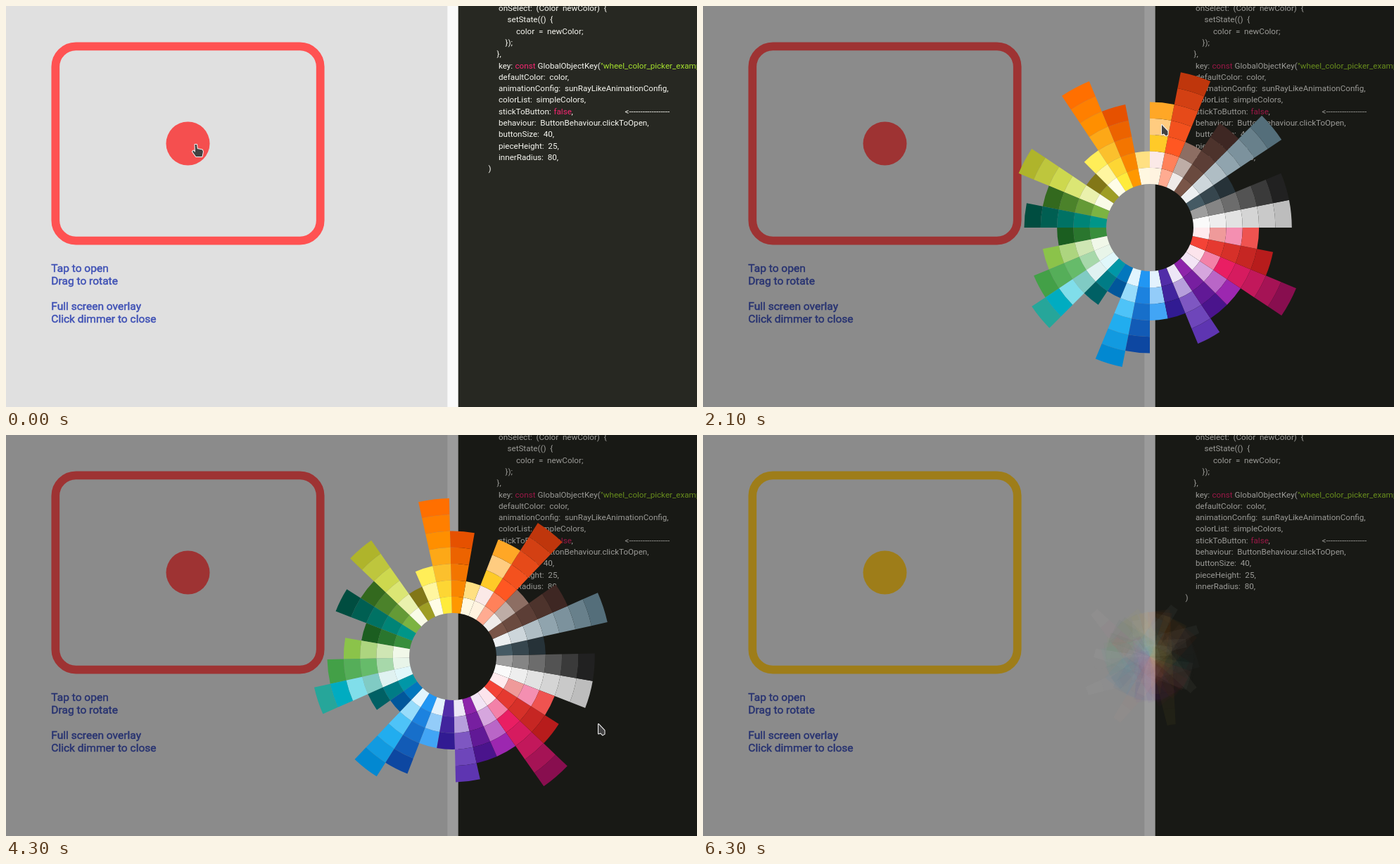
An HTML page with a canvas for the animation above (6.4 s loop, 982 px wide and 570 px high).

```html
<!DOCTYPE html>
<html lang="en">
<head>
<meta charset="utf-8">
<title>Wheel color picker</title>
<style>
html, body { margin: 0; width: 100%; height: 100%; overflow: hidden; background: #e0e0e0; }
canvas { display: block; }
</style>
</head>
<body>
<canvas id="stage" width="982" height="570"></canvas>
<script>
const ctx = document.getElementById('stage').getContext('2d');
const LOOP = 6400, STEP = 100;
const INNER = 62, PIECE = 23.3, SLICE = Math.PI / 16;

const clamp = v => Math.max(0, Math.min(1, v));
const mix = (a, b, k) => a + (b - a) * k;
const ramp = (t, from, to) => clamp((t - from) / (to - from));
const smooth = x => x * x * (3 - 2 * x);
const easeOut = (x, power) => 1 - (1 - x) ** power;

// Number of pieces and colour stops from the hub outwards, clockwise from the right.
const rays = `4 ffebee ef9a9a f48fb1 ef5350
5 f44336 b71c1c
7 fce4ec e91e63 c2185b 880e4f
4 f3e5f5 9c27b0
4 8e24aa 4a148c
5 ede7f6 7e57c2 5e35b1
3 512da8 311b92
3 e3f2fd 42a5f5
5 2196f3 0d47a1
6 e1f5fe 29b6f6 0288d1
2 0277bd 01579b
3 0097a7 006064
6 e0f7fa e0f2f1 80cbc4 80deea 00acc1 26a69a
5 e8f5e9 66bb6a 43a047
4 f1f8e9 8bc34a
3 388e3c 1b5e20
5 009688 004d40
4 7cb342 33691e
6 f9fbe7 d4e157 afb42b
2 9e9d24 827717
3 fffde7 ffee58
7 ffeb3b fbc02d ff8f00 ff6f00
5 ff9800 e65100
2 fff8e1 ffe082
5 fff3e0 fbe9e7 ffca28 ffcc80 ffa726
7 ffab91 ff5722 e64a19 bf360c
3 efebe9 8d6e63
5 795548 3e2723
7 eceff1 90a4ae 546e7a
3 455a64 263238
6 9e9e9e 212121
6 fafafa bdbdbd`.split('\n').map(gradient);

function gradient(line) {
  const [count, ...stops] = line.split(' ');
  const channel = (hex, j) => parseInt(hex.slice(2 * j, 2 * j + 2), 16);
  return Array.from({ length: +count }, (_, n) => {
    const pos = n / (count - 1) * (stops.length - 1);
    const k = Math.min(Math.floor(pos), stops.length - 2);
    const rgb = [0, 1, 2].map(j => mix(channel(stops[k], j), channel(stops[k + 1], j), pos - k));
    return `rgb(${rgb.map(Math.round)})`;
  });
}

// Time and place of the pointer's turning points.
const path = [[100, 270, 197], [300, 267, 193], [1400, 267, 193], [2100, 652, 169],
  [2500, 645, 169], [3000, 321, 243], [3200, 365, 195], [3800, 709, 187], [4300, 842, 411],
  [4700, 681, 203], [5200, 681, 203], [5600, 420, 0], [6200, 131, -20]];

const arrow = new Path2D('M0 0V13.5L3 12.5 6 15.5 8.5 14V9Z');
const hand = new Path2D('M-1.5 0H1L1.8 6 9 7.5 10 10 8.5 17H0L-5 10-3.5 8.5-1 11Z');

const white = '#f8f8f2', pink = '#f92672', green = '#a6e22e';
// [line, x, text, colour]
const code = [
  [0, 700, 'onSelect:  (Color  newColor)  {'],
  [1, 712.5, 'setState(()  {'],
  [2, 725, 'color  =  newColor;'],
  [3, 709.5, '});'],
  [4, 697.5, '},'],
  [5, 700, 'key:'],
  [5, 723.5, 'const', pink],
  [5, 755.5, 'GlobalObjectKey('],
  [5, 845, '"wheel_color_picker_example"', green],
  [6, 700, 'defaultColor:  color,'],
  [7, 700, 'animationConfig:  sunRayLikeAnimationConfig,'],
  [8, 700, 'colorList:  simpleColors,'],
  [9, 700, 'stickToButton:'],
  [9, 778.5, 'false', pink],
  [9, 803.5, ','],
  [9, 879.5, '<' + '-'.repeat(18)],
  [10, 700, 'behaviour:  ButtonBehaviour.clickToOpen,'],
  [11, 700, 'buttonSize:  40,'],
  [12, 700, 'pieceHeight:  25,'],
  [13, 700, 'innerRadius:  80,'],
  [14, 685.5, ')']
];
const notes = ['Tap to open', 'Drag to rotate', '', 'Full screen overlay', 'Click dimmer to close'];

function rect(color, x, y, w, h) {
  ctx.fillStyle = color;
  ctx.fillRect(x, y, w, h);
}

function disc(color) {
  ctx.fillStyle = color;
  ctx.beginPath();
  ctx.arc(258.5, 195.5, 31, 0, 7);
  ctx.fill();
}

function drawPage(t) {
  rect('#e0e0e0', 0, 0, 982, 570);
  rect('#fafafa', 627.3, 0, 355, 570);
  rect('#272822', 642.7, 0, 340, 570);

  const color = t < 5000 ? '#ff5252' : '#ffca28';
  ctx.strokeStyle = color;
  ctx.lineWidth = 11.7;
  ctx.beginPath();
  ctx.roundRect(70.3, 57.3, 376.4, 276.4, 29);
  ctx.stroke();
  disc(color);
  if (t < 800) disc('rgba(0,0,0,.04)');

  ctx.font = '15.54px Roboto, sans-serif';
  ctx.fillStyle = ctx.strokeStyle = '#3f51b5';
  ctx.lineWidth = 0.5;
  notes.forEach((s, i) => {
    const y = Math.round(378.2 + 17.85 * i);
    ctx.fillText(s, 64.3, y);
    ctx.strokeText(s, 64.3, y);
  });
  ctx.font = '11.64px Roboto, sans-serif';
  code.forEach(([line, x, s, c = white]) => {
    ctx.fillStyle = c;
    ctx.fillText(s, x, 7 + 16.3 * line);
  });
}

// Degrees: two drags, then a short settling.
function spin(t) {
  return -4 * ramp(t, 2100, 2400)
    - 73.7 * easeOut(ramp(t, 2500, 3000), 5)
    + 98.9 * smooth(ramp(t, 3800, 4300))
    - 1.6 * ramp(t, 4300, 4600);
}

// 0 is folded into the hub, 1 is fully out; the rays take turns.
function reach(i, t) {
  const opens = 1165 + 225 * Math.cos(2 * Math.PI * i / 3.5);
  const closes = 4960 + 130 * Math.sqrt((i + 15) * 19 % 32);
  return easeOut(ramp(t, opens, opens + 500), 2) - ramp(t, closes, closes + 620) ** 2;
}

function drawRay(colors) {
  colors.forEach((c, n) => {
    const r = INNER + PIECE * n;
    ctx.fillStyle = c;
    ctx.beginPath();
    ctx.arc(0, 0, r, 0, SLICE);
    ctx.arc(0, 0, r + PIECE, SLICE, 0, true);
    ctx.fill();
  });
}

function drawWheel(t) {
  ctx.save();
  ctx.globalAlpha = ramp(t, 700, 1000) * ramp(t, 6312, 6012);
  ctx.translate(635, 315);
  ctx.rotate(spin(t) * Math.PI / 180);
  for (let i = rays.length - 1; i >= 0; i--) {
    ctx.save();
    ctx.rotate(i * SLICE);
    ctx.translate((reach(i, t) - 1) * PIECE * rays[i].length, 0);
    drawRay(rays[i]);
    ctx.restore();
  }
  ctx.restore();
}

function drawPointer(t) {
  const shape = t < 800 ? hand : arrow;
  const next = path.findIndex(p => p[0] > t);
  if (next < 0) return;
  const to = path[next], from = path[next - 1] || to;
  const k = ramp(t, from[0], to[0] + 1e-6);
  ctx.save();
  ctx.translate(mix(from[1], to[1], to === from ? 0 : k), mix(from[2], to[2], k));
  ctx.lineJoin = 'round';
  ctx.lineWidth = 2;
  ctx.strokeStyle = '#f4f4f4';
  ctx.stroke(shape);
  ctx.fillStyle = '#424242';
  ctx.fill(shape);
  ctx.restore();
}

const start = performance.now();

function draw() {
  const elapsed = (performance.now() - start) % LOOP;
  const t = Math.floor(elapsed / STEP) * STEP;
  drawPage(t);
  if (t >= 800) {
    rect(`rgba(0,0,0,${0.38 * ramp(t, 700, 1000)})`, 0, 0, 982, 570);
    drawWheel(t);
  }
  drawPointer(t);
  requestAnimationFrame(draw);
}
draw();
</script>
</body>
</html>
```
